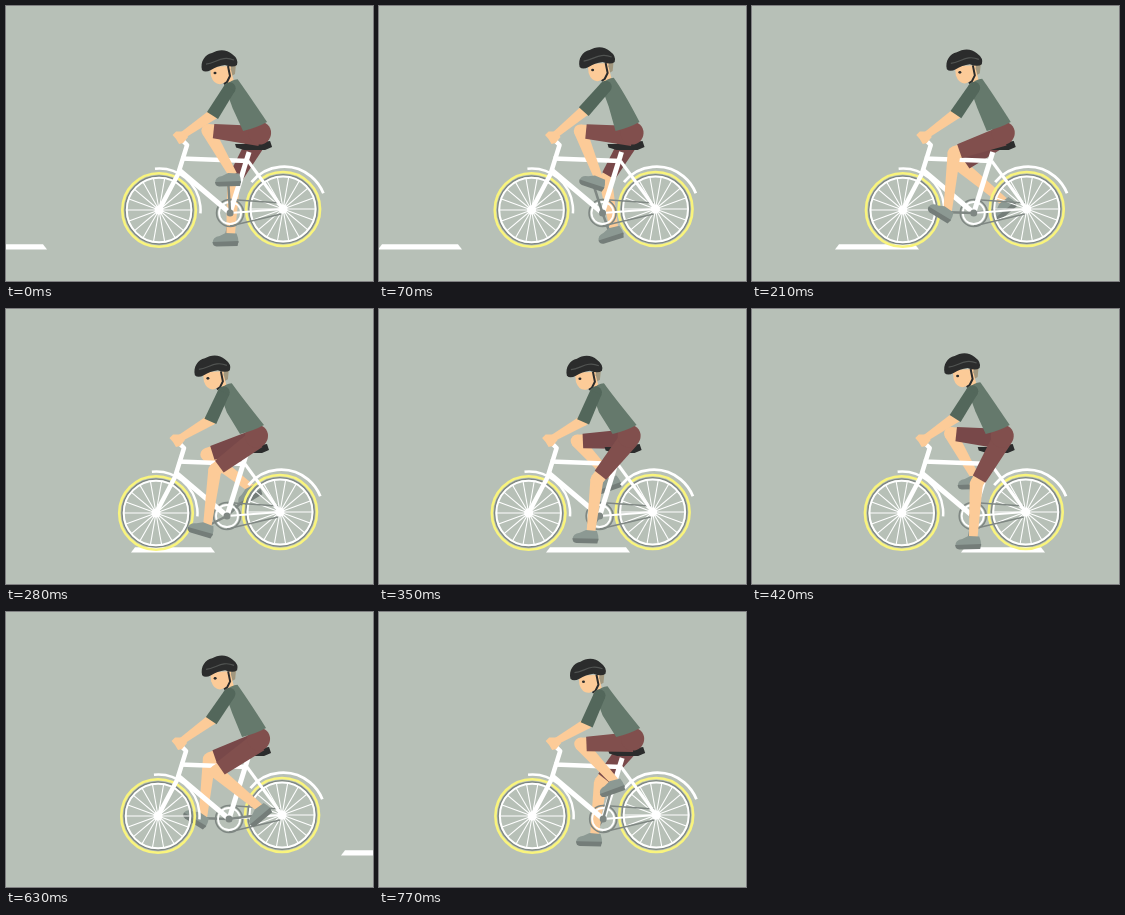
An HTML page with a canvas for the animation above (840 ms loop, 367 px wide and 275 px high).

```html
<!DOCTYPE html>
<html lang="en">
<head>
<meta charset="utf-8">
<title>Cyclist</title>
<style>
html, body { margin: 0; width: 100%; height: 100%; overflow: hidden; background: #b7c0b7; }
canvas { display: block; width: 367px; height: 275px; }
</style>
</head>
<body>
<canvas id="stage" width="367" height="275"></canvas>
<script>
const ctx = document.getElementById('stage').getContext('2d');
const TAU = Math.PI * 2, STEP = 70, STEPS = 12;
const color = {
  bg: '#b7c0b7', white: '#ffffff', yellow: '#f9f47d', grey: '#7f8783',
  skin: '#fccb98', shirt: '#65796c', sleeve: '#53675b',
  shorts: '#814f4d', farShorts: '#784849', shoe: '#8c9993', sole: '#747d79',
  black: '#2b2c2c', hair: '#a1977e'
};

// Shoe centre relative to the bottom bracket, and its tilt in degrees, over one turn.
const pedalCycle = [
  [-2, -33, 0], [-10, -31, 20], [-19, -24, 35], [-33, -1, 33],
  [-26, 13, 18], [-14, 21, 3], [-4.5, 27, 0], [8, 22, -16],
  [17.5, 14, -33], [30, -4, -38], [22, -21, -30], [8.5, -31, -18]
];
const frontHub = [151, 204], rearHub = [275, 203], bracket = [222, 207];
const hip = [251.5, 130], THIGH = 52;

function shape(points, fill) {
  ctx.fillStyle = fill;
  ctx.beginPath();
  points.forEach(p => ctx.lineTo(p[0], p[1]));
  ctx.closePath();
  ctx.fill();
}
function line(points, stroke, width) {
  ctx.strokeStyle = stroke;
  ctx.lineWidth = width;
  ctx.beginPath();
  points.forEach(p => ctx.lineTo(p[0], p[1]));
  ctx.stroke();
}
function arc([x, y], r, stroke, width, from = 0, to = TAU) {
  ctx.strokeStyle = stroke;
  ctx.lineWidth = width;
  ctx.beginPath();
  ctx.arc(x, y, r, from, to);
  ctx.stroke();
}
function oval(x, y, rx, ry, fill) {
  ctx.fillStyle = fill;
  ctx.beginPath();
  ctx.ellipse(x, y, rx, ry, 0, 0, TAU);
  ctx.fill();
}
function limb(a, b, wa, wb, fill) {
  const d = Math.hypot(b[0] - a[0], b[1] - a[1]);
  const nx = (a[1] - b[1]) / d / 2, ny = (b[0] - a[0]) / d / 2;
  shape([
    [a[0] + nx * wa, a[1] + ny * wa], [b[0] + nx * wb, b[1] + ny * wb],
    [b[0] - nx * wb, b[1] - ny * wb], [a[0] - nx * wa, a[1] - ny * wa]
  ], fill);
}
const mix = (a, b, k) => [a[0] + (b[0] - a[0]) * k, a[1] + (b[1] - a[1]) * k];
const radians = degrees => degrees * Math.PI / 180;

function shoe(x, y, tilt) {
  ctx.save();
  ctx.translate(x, y);
  ctx.rotate(tilt);
  ctx.fillStyle = color.shoe;
  ctx.beginPath();
  ctx.moveTo(-13, 3);
  ctx.quadraticCurveTo(-13, -3, -6, -4);
  ctx.lineTo(0, -7);
  ctx.lineTo(11, -6.5);
  ctx.quadraticCurveTo(13, -2, 13, 3);
  ctx.fill();
  ctx.fillStyle = color.sole;
  ctx.beginPath();
  ctx.moveTo(-13, 2);
  ctx.lineTo(13, 1);
  ctx.lineTo(12, 6);
  ctx.lineTo(-9, 6.5);
  ctx.quadraticCurveTo(-13, 6, -13, 2);
  ctx.fill();
  ctx.restore();
}

function leg(step, cloth) {
  const [sx, sy, degrees] = pedalCycle[step % STEPS];
  const x = bracket[0] + sx, y = bracket[1] + sy, tilt = radians(degrees);
  const c = Math.cos(tilt), s = Math.sin(tilt);
  const ankle = [x + 5 * c + 5 * s, y + 5 * s - 5 * c];
  const swing = radians(27 - 34 * Math.cos(TAU * (step - 0.45) / STEPS));
  const knee = [hip[0] - THIGH * Math.cos(swing), hip[1] + THIGH * Math.sin(swing)];
  line([bracket, [x, y]], color.grey, 2.5);
  limb(knee, ankle, 13, 8.5, color.skin);
  oval(...knee, 6.5, 6.5, color.skin);
  limb(hip, knee, 15, 13, color.skin);
  shoe(x, y, tilt);
  limb(hip, mix(hip, knee, 0.89), 20, 14.5, cloth);
}

function wheel(hub, radius) {
  arc(hub, radius, color.yellow, 2.6);
  arc(hub, radius - 2.8, color.grey, 1.5);
  arc(hub, radius - 4.5, color.white, 2);
  for (let i = 0; i < 18; i++) {
    const a = i * TAU / 18;
    line([hub, [hub[0] + 32 * Math.cos(a), hub[1] + 32 * Math.sin(a)]], color.white, 1.1);
  }
  oval(...hub, 4.5, 4.5, color.white);
}

function bicycle() {
  wheel(frontHub, 36.8);
  wheel(rearHub, 37);
  arc(frontHub, 41.5, color.white, 2.5, -1.67, 0.08);
  arc([276, 203], 42.3, color.white, 2.8, -2.45, -0.38);

  line([[222, 193.5], [273, 197]], color.grey, 1.4);
  line([[222, 220], [273, 208]], color.grey, 1.4);
  arc(bracket, 13.5, color.grey, 1.6);
  arc(bracket, 11, color.white, 1.8);

  line([bracket, rearHub], color.white, 2.2);
  line([[240, 155], rearHub], color.white, 3);
  line([bracket, [241, 146]], color.white, 5);
  line([[173, 152.5], [240, 155]], color.white, 4.5);
  line([[171, 164], bracket], color.white, 5);
  line([frontHub, [170, 168], [179, 139], [174, 134]], color.white, 4.5);
  oval(...bracket, 3.5, 3.5, color.grey);
  shape([[227, 138], [240, 138], [262, 135], [264, 141], [257, 144], [236, 144], [228, 141.5]], color.black);
}

function head(x, y) {
  ctx.save();
  ctx.translate(x, y);
  shape([[10, 7], [17, 4], [16, 14], [11, 17]], color.hair);
  shape([[5, 12], [12, 10], [15, 22], [7, 25]], color.skin);
  ctx.fillStyle = color.skin;
  ctx.beginPath();
  ctx.moveTo(-9, 7);
  ctx.lineTo(-8, 16);
  ctx.quadraticCurveTo(-5, 25, 2, 24);
  ctx.quadraticCurveTo(11, 22, 12, 6);
  ctx.fill();
  oval(-4, 13, 1.5, 1.3, color.black);
  line([[9, 6], [11, 16], [8, 22], [5, 24]], color.black, 2);
  ctx.fillStyle = color.black;
  ctx.beginPath();
  ctx.moveTo(-17, 10);
  ctx.bezierCurveTo(-19, 2, -14, -6, -7, -7);
  ctx.bezierCurveTo(-1, -11, 8, -11, 13, -6);
  ctx.quadraticCurveTo(20, -1, 18, 5);
  ctx.quadraticCurveTo(14, 8, 6, 5);
  ctx.quadraticCurveTo(-2, 6, -8, 10);
  ctx.quadraticCurveTo(-14, 13, -17, 10);
  ctx.fill();
  ctx.strokeStyle = '#515452';
  ctx.lineWidth = 1.2;
  ctx.beginPath();
  ctx.moveTo(-13, 4);
  ctx.bezierCurveTo(-3, 3, 3, -5, 15, 0);
  ctx.stroke();
  ctx.restore();
}

function torso([sx, sy]) {
  ctx.fillStyle = color.shirt;
  ctx.beginPath();
  ctx.moveTo(sx - 5, sy - 2);
  ctx.quadraticCurveTo(sx + 2, sy - 9, sx + 8, sy - 9);
  ctx.quadraticCurveTo(sx + 18, sy + 5, 259, 116);
  ctx.quadraticCurveTo(248, 122, 235, 125);
  ctx.lineTo(sx + 3, sy + 20);
  ctx.fill();
}

function arm(shoulder, elbow) {
  const hand = [172, 131];
  limb(elbow, hand, 11, 6.5, color.skin);
  oval(...elbow, 5.5, 5.5, color.skin);
  shape([[176, 125.5], [168, 125.5], [164.5, 129], [168, 133], [171, 138], [175, 137], [180, 131]], color.skin);
  oval(...shoulder, 6, 6, color.sleeve);
  limb(shoulder, mix(shoulder, elbow, 1.06), 12, 13, color.sleeve);
}

function roadMark(step) {
  const right = -1 + 42 * ((step + 1) % STEPS), left = right - 84;
  shape([[left + 4, 238.3], [right - 4, 238.3], [right, 243.5], [left, 243.5]], color.white);
}

function draw(step) {
  const sway = 0.4 + 1.8 * Math.cos(TAU * (step + 0.7) / STEPS);
  const bob = Math.cos(TAU * (step - 1.6) / 6);
  const shoulder = [222 + 4 * bob, 82 - 1.5 * bob];
  const elbow = [205.3 - bob, 107.5 - 4 * bob];

  ctx.fillStyle = color.bg;
  ctx.fillRect(0, 0, 367, 275);
  roadMark(step);
  ctx.save();
  ctx.translate(sway, 0);
  leg(step + 6, color.farShorts);
  bicycle();
  leg(step, color.shorts);
  oval(251.5, 127, 11.5, 11.5, color.shorts);
  head(211.5 + 5.7 * bob, 53.7 - 3.3 * bob);
  torso(shoulder);
  arm(shoulder, elbow);
  ctx.restore();
}

ctx.lineJoin = 'round';
function tick() {
  draw(Math.floor(performance.now() / STEP) % STEPS);
  requestAnimationFrame(tick);
}
tick();
</script>
</body>
</html>
```
